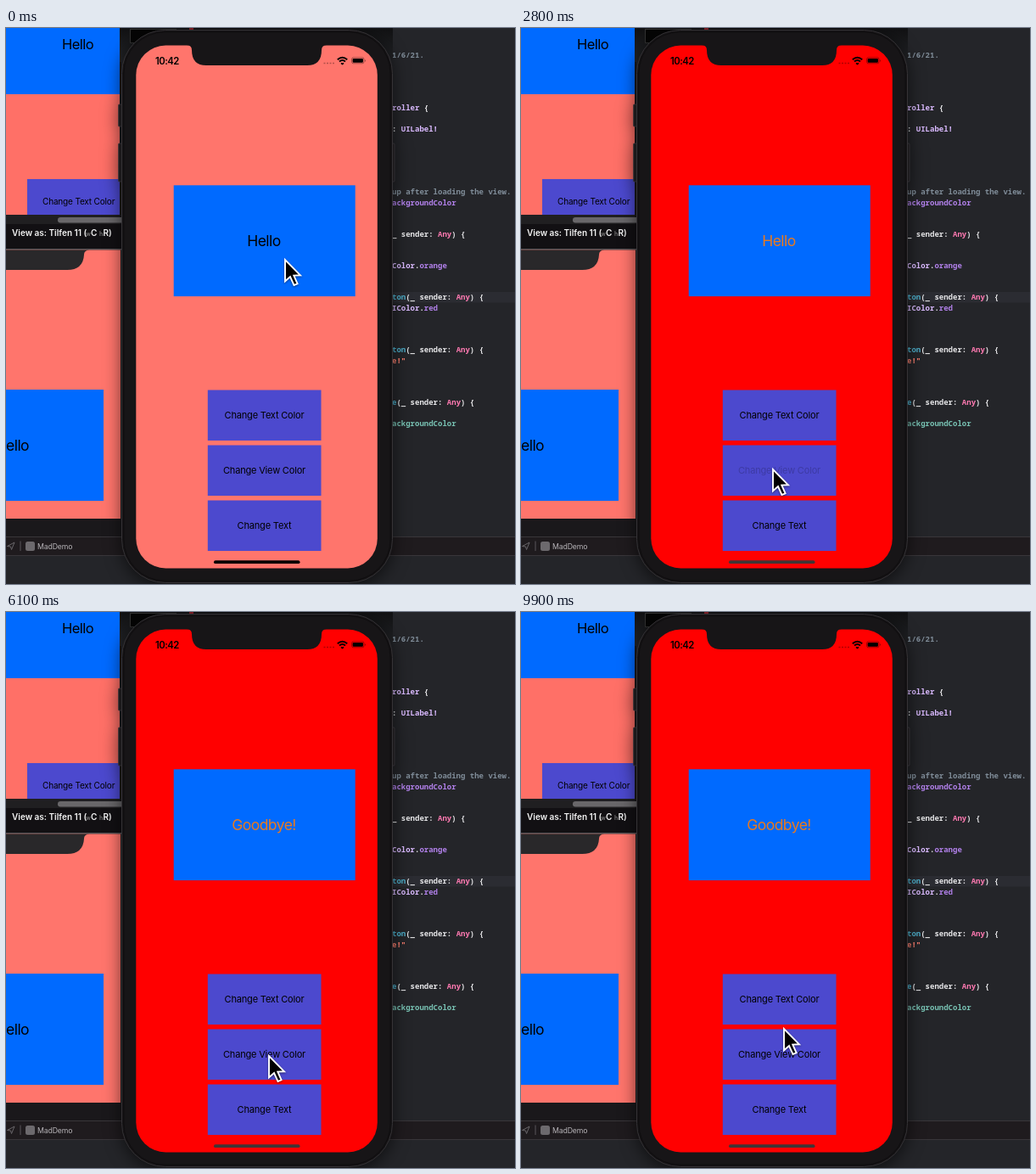
Animation, 600 px wide and 655 px high, one loop 10 s. Source, as an HTML page:

```html
<!DOCTYPE html>
<html lang="en">
<head>
<meta charset="utf-8">
<title>Simulator demo</title>
<style>
html, body { margin: 0; width: 100%; height: 100%; overflow: hidden; background: #242529; }
svg { display: block; width: 600px; height: 655px; font-family: Inter, "Open Sans", sans-serif; letter-spacing: -.033em; }
.small { letter-spacing: -.016em; }
.mono { font: 600 9px "Noto Sans Mono", "DejaVu Sans Mono", monospace; letter-spacing: 0; fill: #e6e6e8; white-space: pre; }
.mid { text-anchor: middle; }
.k { fill: #ff7ab2; font-weight: 700; }
.t { fill: #dabaff; }
.p { fill: #b281eb; }
.f { fill: #4eb0cc; }
.g { fill: #78c2b3; }
.c { fill: #7f8c98; }
.s { fill: #ff8170; }
</style>
</head>
<body>
<svg viewBox="0 0 600 655">
  <defs>
    <linearGradient id="top" x2="0" y2="1"><stop offset="0" stop-color="#111113"/><stop offset="1" stop-color="#242529"/></linearGradient>
  </defs>

  <!-- editor -->
  <rect width="600" height="655" fill="#242529"/>
  <rect x="440" y="311" width="160" height="12.5" fill="#2b2c32"/>
  <g id="code"></g>

  <!-- storyboard -->
  <rect width="136" height="600" fill="#1a181b"/>
  <rect width="134" height="220" fill="#ff7067"/>
  <rect width="134" height="78" fill="#006aff"/>
  <text x="66" y="25" font-size="16.5">Hello</text>
  <rect x="25" y="178" width="109" height="42" fill="#4c49ce"/>
  <text class="small" x="43" y="208.3" font-size="10">Change Text Color</text>
  <rect y="220" width="134" height="11" fill="#201f21"/>
  <rect x="61" y="223" width="90" height="6.5" rx="3.2" fill="#69676a"/>
  <rect y="231" width="136" height="29" fill="#121013"/>
  <text y="245" font-size="10" font-weight="600" letter-spacing="0" fill="#f4f4f4"><tspan x="7">View as: Tilfen 11 (</tspan><tspan x="94" font-size="7" fill="#777">w</tspan><tspan x="100">C</tspan><tspan x="110" font-size="7" fill="#777">h</tspan><tspan x="114.5">R)</tspan></text>
  <rect y="260" width="136" height="1.5" fill="#5d595c"/>
  <rect y="261.5" width="135" height="316.5" fill="#ff756c"/>
  <path d="M0 261.5H98Q92 262 92 267Q91 285 72 285H0Z" fill="#29282a"/>
  <rect y="426" width="115" height="131" fill="#006aff"/>
  <text x="0" y="498" font-size="17.5">ello</text>

  <!-- debug bar -->
  <rect y="599" width="600" height="23" fill="#1f1b1e"/>
  <path d="M0 599.5H600M0 621.5H600" stroke="#39363a"/>
  <path d="M1.5 610.5L10 606L6.5 614.5L5.5 611Z" fill="none" stroke="#686569"/>
  <path d="M17 604.5V616" stroke="#5a565b"/>
  <rect x="23" y="605" width="11" height="11" rx="2.5" fill="#6c696d"/>
  <text class="small" x="37" y="613.5" font-size="8.7" fill="#b6b3b7">MadDemo</text>

  <!-- phone -->
  <rect x="134" width="322" height="40" fill="url(#top)"/>
  <rect x="146.5" y="1.5" width="54" height="16" fill="#050505" stroke="#333"/>
  <rect x="216" width="5" height="4" fill="#8d2028"/>
  <g fill="#1b191b" stroke="#38363a" stroke-width=".7" style="filter:drop-shadow(0 4px 10px #0009)">
    <rect x="132.5" y="90" width="6" height="26" rx="1"/>
    <rect x="132.5" y="136" width="6" height="45" rx="1"/>
    <rect x="452" y="136" width="6" height="45" rx="1"/>
    <rect x="136.5" y="2.5" width="319" height="651" rx="51" fill="#141214" stroke="#353336" stroke-width="1"/>
    <rect x="139" y="5" width="314" height="646" rx="48" fill="#171517" stroke="#0d0c0d"/>
  </g>
  <rect id="view" x="153.3" y="20.5" width="284.5" height="616" rx="35"/>
  <path d="M213 20H378Q372 20.5 372 26Q372 44 355 44H236Q219 44 219 26Q219 20.5 213 20Z" fill="#171517"/>
  <text x="176" y="42.7" font-size="11.3" font-weight="600">10:42</text>
  <path d="M374.5 41.5H387" stroke="#000" stroke-opacity=".3" stroke-width="1.6" stroke-dasharray="2 1.5"/>
  <g fill="none" stroke="#000" stroke-width="1.9">
    <path d="M390.8 37.3Q396.5 32.3 402.2 37.3M393 39.5Q396.5 36.5 400 39.5"/>
    <path d="M395 41.3L396.5 42.5L398 41.3" stroke-width="1.5"/>
    <rect x="407.5" y="34.8" width="14.5" height="7" rx="2" stroke-opacity=".45" stroke-width=".8"/>
  </g>
  <rect x="408.6" y="35.9" width="12.3" height="4.8" rx="1"/>
  <path d="M423 37V40Q424.8 38.5 423 37" opacity=".5"/>
  <rect x="197.7" y="185.3" width="214" height="130.8" fill="#006aff"/>
  <text id="label" class="mid" x="304" y="257" font-size="17.5"></text>
  <g id="buttons"></g>
  <rect id="home" x="245" y="627.3" width="101.5" height="3.7" rx="1.85"/>

  <path id="cursor" d="M1 2V27.3L7 22L11.5 32L15.6 30.3L11.3 20.6L19 20.3Z" stroke="#fff" stroke-width="1.9" style="filter:drop-shadow(0 1px 1px #0007)"/>
</svg>
<script>
const $ = id => document.getElementById(id);
const LOOP = 10000;

// Code lines: row number, then [class, text] runs
const action = [["", "_ sender: "], ["k", "Any"], ["", ") {"]];
const code = [
  [0, ["c", "1/6/21."]],
  [5, ["t", "roller"], ["", " {"]],
  [7, ["", ": "], ["t", "UILabel!"]],
  [13, ["c", "up after loading the view."]],
  [14, ["p", "ackgroundColor"]],
  [17, ...action],
  [20, ["t", "Color"], ["", "."], ["p", "orange"]],
  [23, ["f", "ton"], ["", "("], ...action],
  [24, ["t", "IColor"], ["", "."], ["p", "red"]],
  [28, ["f", "ton"], ["", "("], ...action],
  [29, ["s", 'e!"']],
  [33, ["f", "e"], ["", "("], ...action],
  [35, ["g", "ackgroundColor"]],
];
$("code").innerHTML = code.map(([row, ...runs]) =>
  `<text class="mono" x="455" y="${35 + row * 12.4}">` +
  runs.map(([cls, text]) => `<tspan class="${cls}">${text}</tspan>`).join("") + "</text>").join("");

$("buttons").innerHTML = ["Text Color", "View Color", "Text"].map((name, i) => {
  const y = 426.5 + i * 65;
  return `<rect x="237.8" y="${y}" width="133.7" height="59.5" fill="#4c49ce"/>
    <text class="mid small" x="304.5" y="${y + 33.5}" font-size="11">Change ${name}</text>`;
}).join("");
const captions = [...$("buttons").querySelectorAll("text")];

// Release time of each button's tap
const taps = [1500, 2700, 4000];

// Pointer stops: time, x, y
const path = [
  [0, 328, 271], [300, 328, 271], [1200, 303, 453], [1600, 301, 458], [1900, 302, 483],
  [2400, 296, 518], [2900, 296, 518], [3600, 315, 582], [4100, 318, 586], [4800, 330, 601],
  [5200, 330, 601], [6100, 309, 521], [7000, 304, 500], [8000, 299, 460], [8700, 299, 460],
  [9600, 309, 489], [LOOP, 309, 489],
];

function pointerAt(t) {
  const i = path.findIndex(p => p[0] > t);
  const [t0, x0, y0] = path[i - 1], [t1, x1, y1] = path[i];
  const u = (t - t0) / (t1 - t0), e = u * u * (3 - 2 * u);
  return [x0 + (x1 - x0) * e, y0 + (y1 - y0) * e];
}

// Caption dims on press and fades back after release
function captionAlpha(age) {
  if (age < -100 || age > 450) return 1;
  return age < 150 ? .2 : .2 + .8 * (age - 150) / 300;
}

function draw(now) {
  const t = Math.floor(now % LOOP / 100) * 100;
  const [orange, red, bye] = taps.map(tap => t >= tap);
  $("view").setAttribute("fill", red ? "#f00" : "#ff756c");
  $("home").setAttribute("fill", red ? "#403535" : "#000");
  $("label").setAttribute("fill", orange ? "#ec7a1c" : "#000");
  $("label").textContent = bye ? "Goodbye!" : "Hello";
  captions.forEach((caption, i) => caption.setAttribute("opacity", captionAlpha(t - taps[i])));
  $("cursor").setAttribute("transform", `translate(${pointerAt(t)})`);
}

const start = performance.now();
function tick() {
  draw(performance.now() - start);
  requestAnimationFrame(tick);
}
tick();
</script>
</body>
</html>
```
